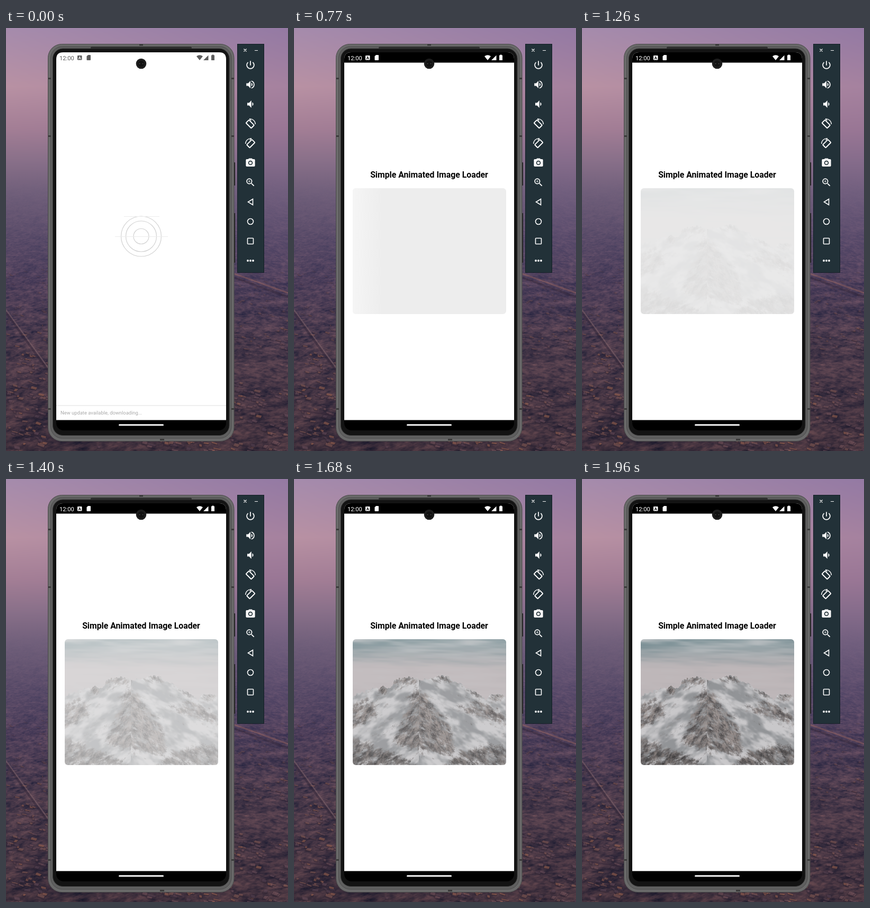
An HTML page with a canvas for the animation above (2030 ms loop, 533x800 px).

```html
<!DOCTYPE html>
<html lang="en">
<head>
<meta charset="utf-8">
<title>Image loader on a phone</title>
<style>
  html, body { margin: 0; width: 100%; height: 100%; overflow: hidden; background: #4c4062; }
  canvas, svg { position: absolute; left: 0; top: 0; display: block; }
  #photo { left: 111px; top: 303px; border-radius: 6px; opacity: 0; }
  text { font-family: Roboto, "Liberation Sans", sans-serif; }
</style>
</head>
<body>
<canvas id="city" width="533" height="800"></canvas>
<svg width="533" height="800" viewBox="0 0 533 800">
  <defs>
    <linearGradient id="shine">
      <stop offset="0" stop-color="#f5f5f5" stop-opacity="0"/>
      <stop offset=".5" stop-color="#f5f5f5"/>
      <stop offset="1" stop-color="#f5f5f5" stop-opacity="0"/>
    </linearGradient>
    <clipPath id="card"><rect x="111" y="303" width="290" height="238" rx="6"/></clipPath>
    <clipPath id="screen"><path d="M95 741V59q0-13 13-13H403q13 0 13 13V741z"/></clipPath>
    <g id="rotate" fill="none" stroke="#fff">
      <rect x="-4" y="-7" width="8" height="14" rx="1" stroke-width="1.900" transform="translate(-.7 .7) rotate(-45)"/>
      <path d="M-2-9A10 10 0 0 1 9.300 1M-2-9l3.500 3" stroke-width="1.400"/>
    </g>
  </defs>

  <!-- phone body -->
  <g fill="#1b1b1b">
    <rect x="430" y="254" width="3" height="44" rx="1"/>
    <rect x="430" y="350" width="3" height="94" rx="1"/>
  </g>
  <rect x="79.500" y="30.500" width="351.500" height="751" rx="26" fill="#6a6a6a" stroke="#484848"/>
  <rect x="84.500" y="35" width="341.500" height="741" rx="22" fill="#5f5f5f" stroke="#4c4c4c"/>
  <rect x="88.500" y="39" width="333.500" height="731.500" rx="19" fill="#131313" stroke="#333"/>
  <rect x="160" y="35.500" width="191" height="4" rx="2" fill="#2d2d2d"/>
  <path d="M252 32h7M291 778.500h8M80 95.500h5M80 204.500h5M426 95.500h5M426 204.500h5M80 720.500h5M426 720.500h5" stroke="#3a3a3a" stroke-width="3"/>
  <rect x="95" y="46" width="321" height="715" rx="14" fill="#000"/>
  <path d="M95 741.500V59q0-13 13-13H403q13 0 13 13V741.500z" fill="#fff"/>
  <rect x="213" y="749.300" width="85" height="3" rx="1.500" fill="#f5f5f5"/>

  <g id="splash">
    <g fill="none" stroke="#d2d2d2" stroke-width="1.200">
      <circle cx="255.5" cy="394" r="14.500"/>
      <circle cx="255.5" cy="394" r="29"/>
      <circle cx="255.5" cy="394" r="38"/>
    </g>
    <path d="M206 394.500H306M223 356.500H290" stroke="#ececec"/>
    <path id="grid" d="M255.500 345V445M274.500 348V440M293.500 360V432M218.500 360V430M225 432.500H290M228 375.500H240M228 413.500H290" stroke="#efefef"/>
    <g id="update">
      <path d="M95 714H416" stroke="#dedede"/>
      <text x="103" y="731" font-size="9.400" fill="#a9a9a9">New update available, downloading...</text>
    </g>
  </g>

  <g id="app">
    <rect x="95" y="46" width="321" height="19.500" fill="#000" clip-path="url(#screen)"/>
    <text x="255.5" y="283" font-size="15.800" font-weight="700" text-anchor="middle">Simple Animated Image Loader</text>
    <g clip-path="url(#card)">
      <rect x="111" y="303" width="290" height="238" fill="#ededed"/>
      <rect id="band" y="303" width="110" height="238" fill="url(#shine)"/>
    </g>
  </g>

  <g id="status">
    <text x="101" y="60.500" font-size="11.200">12:00</text>
    <path fill-rule="evenodd" d="M136 52h6.500q1 0 1 1v6.500q0 1-1 1H136q-1 0-1-1V53q0-1 1-1zM139 53.500l-2.300 5.500h1.200l.5-1.300h1.800l.5 1.300h1.200l-2.300-5.500zM139.300 55l.6 1.800h-1.200z"/>
    <path d="M155 51h4q1 0 1 1v8q0 1-1 1h-5.500q-1 0-1-1v-6.500z"/>
    <path d="M360 53.500q6-4.500 12 0L366 61zM373 61L382.500 51.500V61z"/>
    <path d="M389.500 51.500v-1h3v1h1.500v9.500h-6V51.500z"/>
  </g>
  <circle cx="255.5" cy="67.500" r="9.800" fill="#1d1d1d"/>
  <circle cx="255.5" cy="67.500" r="6" fill="#111"/>
  <path d="M251.500 67.500h2M257.500 67.500h2" stroke="#464646" stroke-width="1.500"/>

  <!-- emulator controls -->
  <rect x="437.5" y="30.500" width="50" height="432" fill="#223138" stroke="#141f27"/>
  <path d="M449.500 39.500l5 5m0-5l-5 5M470 42.500h6" stroke="#fff" stroke-width="1.200"/>
  <g id="tools" fill="#fff"></g>
  <use href="#rotate" x="462" y="181"/>
  <use href="#rotate" transform="translate(462 218) scale(-1 1)"/>
  <g fill="none" stroke="#fff" stroke-width="1.600">
    <path d="M466.500 323.500v11L457.500 329z"/>
    <circle cx="462" cy="366" r="5.500"/>
    <rect x="456.500" y="397.500" width="11" height="11" rx="1"/>
  </g>
  <path d="M457 440h.01M462 440h.01M467 440h.01" stroke="#fff" stroke-width="3.800" stroke-linecap="round"/>
</svg>
<canvas id="photo" width="290" height="238"></canvas>

<script>
const LOOP = 2030, STEP = 70;
const UPDATE_END = 350, APP_START = 770, FADE_START = 1225, FADE_TIME = 700;
const $ = id => document.getElementById(id);
const clamp = (v, lo = 0, hi = 1) => Math.min(hi, Math.max(lo, v));
const mix = (a, b, k) => a + (b - a) * k;
const blend = (a, b, k) => a.map((v, i) => mix(v, b[i], k));
const smooth = (lo, hi, v) => { const k = clamp((v - lo) / (hi - lo)); return k * k * (3 - 2 * k); };

function hash(x, y) {
  let h = Math.imul(x, 374761393) ^ Math.imul(y, 668265263);
  h = Math.imul(h ^ (h >>> 13), 1274126177);
  return ((h ^ (h >>> 16)) >>> 0) / 4294967296;
}
function noise(x, y) {
  const ix = Math.floor(x), iy = Math.floor(y);
  const u = smooth(0, 1, x - ix), v = smooth(0, 1, y - iy);
  return mix(mix(hash(ix, iy), hash(ix + 1, iy), u),
             mix(hash(ix, iy + 1), hash(ix + 1, iy + 1), u), v);
}
const fbm = (x, y) => noise(x, y) * .5 + noise(x * 2 + 9, y * 2 + 5) * .3 + noise(x * 4 + 3, y * 4 + 7) * .2;

function paint(canvas, colorAt) {
  const { width, height } = canvas, ctx = canvas.getContext("2d");
  const image = ctx.createImageData(width, height);
  for (let y = 0, i = 0; y < height; y++) {
    for (let x = 0; x < width; x++, i += 4) {
      image.data.set(colorAt(x, y), i);
      image.data[i + 3] = 255;
    }
  }
  ctx.putImageData(image, 0, 0);
  return ctx;
}

// City at dusk: haze above, perspective ground below.
const haze = [
  [0, [165, 139, 172]], [110, [184, 145, 163]], [190, [163, 126, 149]], [250, [137, 112, 137]],
  [310, [112, 95, 122]], [400, [88, 74, 103]], [480, [78, 63, 90]], [600, [73, 57, 74]], [800, [64, 48, 60]]
];
function hazeAt(y) {
  const i = Math.max(1, haze.findIndex(stop => stop[0] >= y));
  const [y0, a] = haze[i - 1], [y1, b] = haze[i];
  return blend(a, b, (y - y0) / (y1 - y0));
}
const depthAt = y => .15 + Math.max(0, y - 290) / 500;

function drawCity() {
  let row, rowColor;
  const ctx = paint($("city"), (x, y) => {
    if (row !== y) { row = y; rowColor = hazeAt(y); }
    const tint = blend(rowColor, [118, 91, 148], .36 * x / 533 * clamp(1 - y / 520));
    if (y < 250) return tint;
    const d = depthAt(y), depth = 75 * Math.log(d);
    const blocks = fbm((x - 150) / (d * 45), depth / 2.2 + x * .008) - .5;
    const detail = fbm((x - 150) / (d * 10), depth * 1.6 + x * .03) - .5;
    const k = (blocks * 50 + detail * 55) * smooth(250, 600, y);
    return [tint[0] + k * 1.2, tint[1] + k * .75, tint[2] + k * .55];
  });

  let seed = 1;
  const random = () => hash(seed++, 77);
  const roofs = ["#a96c52", "#8f6257", "#72545f", "#7d5a5f", "#5b4656"];
  for (let i = 0; i < 1300; i++) {
    const y = 455 + 345 * random(), x = 533 * random(), d = depthAt(y);
    if (noise(x / 45, y / 28) < .42) continue;
    const w = (3 + 9 * random()) * d, h = (1.5 + 3 * random()) * d;
    ctx.setTransform(1, mix(.1, .35, random()), mix(-.8, .2, random()), 1, x, y);
    ctx.globalAlpha = .15 + .35 * smooth(455, 680, y);
    ctx.fillStyle = "#2b2130";
    ctx.fillRect(-1, h * .4, w + 2, h * 1.1);
    ctx.fillStyle = roofs[Math.floor(random() * roofs.length)];
    ctx.fillRect(0, 0, w, h);
  }
  ctx.setTransform(1, 0, 0, 1, 0, 0);
  const stroke = (path, color, width, alpha) => {
    ctx.globalAlpha = alpha; ctx.strokeStyle = color; ctx.lineWidth = width;
    ctx.stroke(new Path2D(path));
  };
  stroke("M0 533L80 643", "#7d6169", 2.5, .55);
  stroke("M0 538L80 649", "#302535", 4, .45);
  stroke("M432 465L533 501", "#a56d62", 3, .4);
  stroke("M432 472L533 509M0 722L80 733", "#302535", 4, .4);
}

// Snowy massif; polygons use stage coordinates.
const ridge = "M111 412L122 405 140 400 155 393 160 399 168 392 176 396 186 393 190 380 200 377 215 375 228 377 240 381 252 378 268 376 282 372 292 375 302 382 315 388 330 398 345 405 358 412 364 418 372 408 385 407 400 411 402 541H111z";
const rocks = [
  "M238 396L250 408 262 428 280 450 296 475 304 500 300 522 262 517 225 512 192 500 192 485 205 460 212 430 222 408z",
  "M298 424L325 432 342 420 365 424 382 435 402 445V462L375 455 345 445 318 440z",
  "M105 484L140 500 180 512 215 530 240 545H105z",
  "M285 541L310 518 345 508 380 500 405 510V545z",
  "M111 425L140 412 158 428 150 452 125 470 108 476z",
  "M186 393L190 377 215 373 240 380 226 390 205 388z",
  "M262 378L282 371 303 381 296 388 278 384z",
  "M155 393L168 391 186 396 178 406 160 410z",
  "M366 420L372 408 385 407 402 412 400 421z",
  "M304 384L332 398 358 412 350 415 322 402z"
];
function terrainMask() {
  const canvas = document.createElement("canvas");
  canvas.width = 290; canvas.height = 238;
  const ctx = canvas.getContext("2d");
  ctx.fillStyle = "#000";
  ctx.fillRect(0, 0, 290, 238);
  ctx.translate(-111, -303);
  ctx.globalCompositeOperation = "lighter";
  ctx.fillStyle = "#f00";
  ctx.fill(new Path2D(ridge));
  ctx.filter = "blur(4px)";
  ctx.fillStyle = "#0f0";
  rocks.forEach(path => ctx.fill(new Path2D(path)));
  return ctx.getImageData(0, 0, 290, 238).data;
}
function skyAt(x, y) {
  const base = blend([134, 152, 157], [189, 182, 184], smooth(0, 58, y));
  const streak = fbm(x / 110, (y - x * .03) / 13) - .5;
  const top = 1 - smooth(12, 55, y);
  return blend(base, streak > 0 ? [92, 121, 129] : [203, 203, 205], Math.abs(streak) * (.3 + 1.5 * top));
}
function drawMountain() {
  const mask = terrainMask();
  paint($("photo"), (x, y) => {
    const jagged = clamp(Math.round(y + (noise(x / 2.5, 4) - .5) * 5), 0, 237);
    const i = (jagged * 290 + x) * 4;
    if (mask[i] < 128) return skyAt(x, y);
    // Strata fall away to both sides of the central buttress.
    const side = x < 125 ? -1 : 1;
    const n = fbm((x + side * y * .3) / 13, (y - side * x * .5) / 6);
    const grain = noise(x / 1.5, y / 1.6);
    const crack = fbm((x - side * y * .5) / 5, (y + side * x * .2) / 14);
    const rock = smooth(.36, .68, mask[i + 1] / 255 * .27 + n * .48 + grain * .14);
    const snow = blend([146, 148, 151], [201, 200, 202], smooth(.3, .7, fbm(x / 24, (y - side * x * .4) / 16)));
    const stone = blend([58, 55, 56], [152, 141, 137], smooth(.2, .8, crack * .75 + grain * .25));
    const dark = 1 - .25 * smooth(185, 235, y);
    return blend(snow, stone.map(v => v * dark), rock * .85);
  });
}

function drawTools() {
  const icons = {
    70: "M13 3h-2v10h2zm4.830 2.170l-1.420 1.420A6.920 6.920 0 0119 12a7 7 0 01-14 0c0-2.120.950-4.020 2.420-5.310L6.170 5.170A8.930 8.930 0 003 12a9 9 0 0018 0c0-2.740-1.230-5.180-3.170-6.830z",
    107: "M3 9v6h4l5 5V4L7 9zm13.500 3c0-1.770-1.020-3.290-2.500-4.030v8.050c1.480-.730 2.500-2.250 2.500-4.020zM14 3.230v2.060a7 7 0 010 13.420v2.060a9 9 0 000-17.540z",
    144: "M18.500 12c0-1.770-1.020-3.290-2.500-4.030v8.050c1.480-.730 2.500-2.250 2.500-4.020zM5 9v6h4l5 5V4L9 9z",
    255: "M9 2L7.170 4H4a2 2 0 00-2 2v12a2 2 0 002 2h16a2 2 0 002-2V6a2 2 0 00-2-2h-3.170L15 2zM12 7a5 5 0 110 10a5 5 0 110-10zM12 9a3 3 0 100 6a3 3 0 100-6z",
    292: "M15.500 14h-.790l-.280-.270A6.470 6.470 0 0016 9.500 6.500 6.500 0 109.500 16c1.610 0 3.090-.590 4.230-1.570l.270.280v.790l5 4.990L20.490 19zm-6 0a4.500 4.500 0 110-9 4.500 4.500 0 010 9zM12 10h-2v2H9v-2H7V9h2V7h1v2h2z"
  };
  $("tools").innerHTML = Object.entries(icons).map(([y, d]) =>
    `<path fill-rule="evenodd" transform="translate(462 ${y}) scale(.86) translate(-12 -12)" d="${d}"/>`).join("");
}

const show = (id, on) => $(id).setAttribute("visibility", on ? "inherit" : "hidden");

function render(now) {
  const t = Math.floor(now % LOOP / STEP) * STEP;
  const appOn = t >= APP_START;
  show("splash", !appOn);
  show("update", t < UPDATE_END);
  show("grid", t >= UPDATE_END);
  show("app", appOn);
  show("band", appOn && t < FADE_START);
  $("status").setAttribute("fill", appOn ? "#fff" : "#5c5c5c");
  $("band").setAttribute("x", 56 + (t - APP_START) * .38);
  const left = 1 - clamp((t - FADE_START) / FADE_TIME);
  $("photo").style.opacity = 1 - left * left;
}
function tick(now) {
  render(now);
  requestAnimationFrame(tick);
}

drawCity();
drawMountain();
drawTools();
render(0);
requestAnimationFrame(tick);
</script>
</body>
</html>
```
